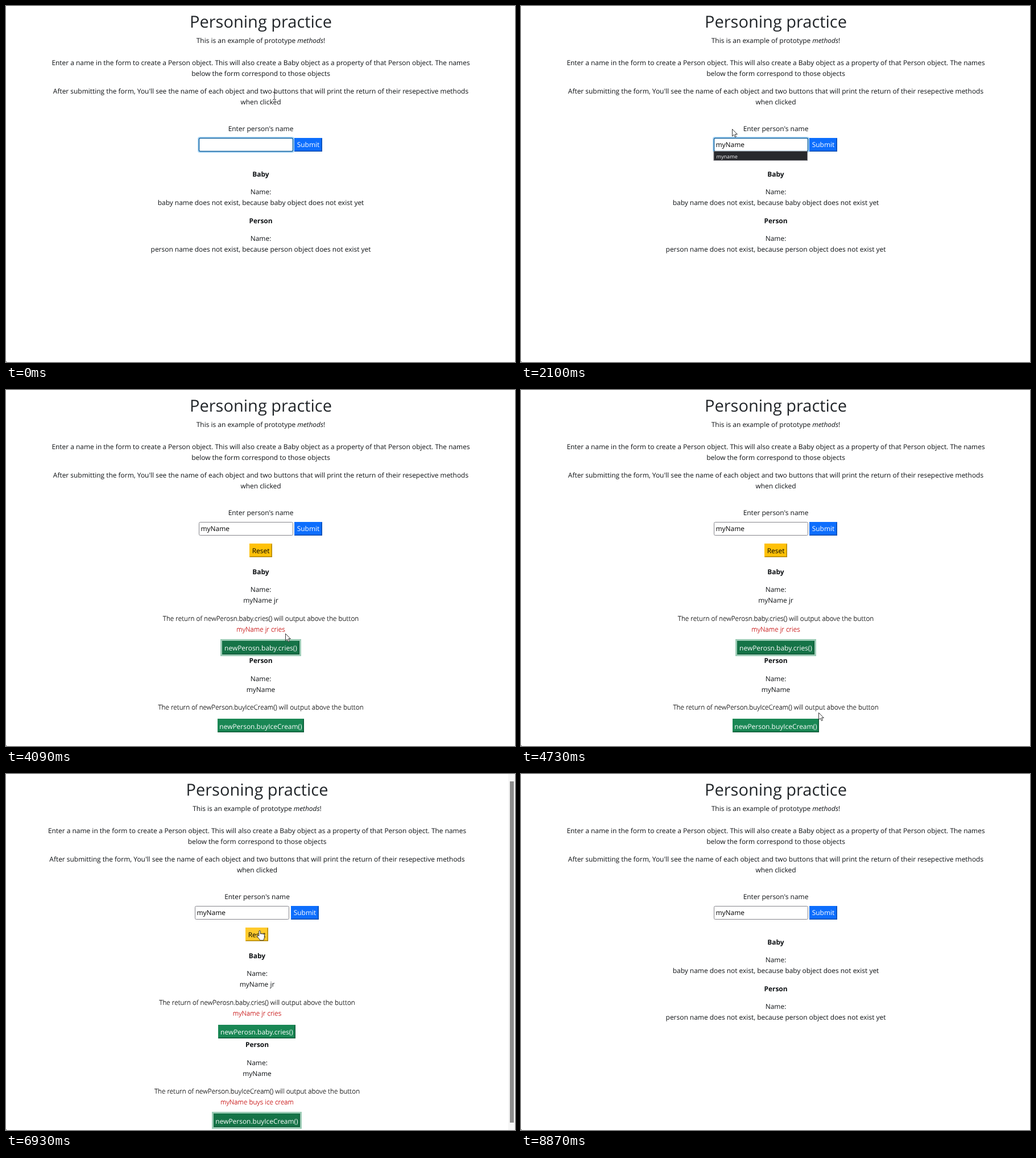
Write an HTML page that moves like this. It is 895x626 px and loops after 9040 ms.

```html
<!DOCTYPE html>
<html lang="en">
<head>
<meta charset="utf-8">
<title>Personing practice</title>
<style>
  html, body { margin: 0; width: 100%; height: 100%; overflow: hidden; background: #fff; }
  svg { display: block; width: 895px; height: 626px; }
  text {
    font: 11.95px "Open Sans", "Noto Sans", sans-serif;
    fill: #0e1114; text-anchor: middle; text-rendering: geometricPrecision; white-space: pre;
  }
  .title { font-size: 29px; fill: #212529; }
  .bold { font-weight: 700; }
  .light { font-weight: 300; font-size: 11.75px; fill: #000; stroke: #000; stroke-width: .15px; }
  .red { fill: #c40000; stroke: #c40000; }
  .left { text-anchor: start; }
  .off { display: none; }

  #page.scrolled { transform: translate(-7px, 0); }
  #page.scrolled .line { transform: translate(.5px, 0); }
  #page.scrolled #submit { transform: translate(1px, 0); }

  #box { fill: #fff; stroke: #85858c; }
  #glow { fill: none; stroke: #a9d5f5; stroke-width: 2; visibility: hidden; }
  #field.focus #box { stroke: #14639f; stroke-width: 1.5; }
  #field.focus #glow { visibility: visible; }
  #typed { fill: #000; }

  .ring { fill: var(--ring); visibility: hidden; }
  .focus .ring { visibility: visible; }
  .face { fill: var(--face); }
  .edge { fill: var(--edge); }
  .hot .face { fill: var(--hot); }
  .btn text { fill: var(--ink, #fff); }
  .blue { --face: #0d6efd; --hot: #0b5ed7; --edge: #0a4bac; --ring: #98c1fe; }
  .gold { --face: #ffc107; --hot: #ffca2c; --edge: #b08608; --ring: #ecd182; --ink: #000; }
  .green { --face: #198754; --hot: #157347; --edge: #105a38; --ring: #9dccb6; }

  #list rect { fill: #28292d; stroke: #77777d; }
  #list text { font-size: 9.1px; fill: #f4f4f6; }
  #cursor path { fill: #fff; stroke: #222; stroke-width: .9; stroke-linejoin: round; }
  #cursor .ibeam { fill: none; }
</style>
</head>
<body>
<svg viewBox="0 0 895 626">
  <g id="page">
    <text class="line title" x="448" y="38">Personing practice</text>
    <text class="line" x="448" y="65">This is an example of prototype <tspan font-style="italic">methods</tspan>!</text>
    <text class="line" x="448" y="104">Enter a name in the form to create a Person object. This will also create a Baby object as a property of that Person object. The names</text>
    <text class="line" x="448" y="123">below the form correspond to those objects</text>
    <text class="line" x="448" y="154">After submitting the form, You'll see the name of each object and two buttons that will print the return of their resepective methods</text>
    <text class="line" x="448" y="173">when clicked</text>
    <text class="line" x="448" y="220">Enter person's name</text>

    <g id="field">
      <rect id="glow" x="338" y="231" width="168" height="26" rx="3"/>
      <rect id="box" x="339.5" y="232.5" width="165" height="23" rx="2"/>
      <text id="typed" class="left" x="342.5" y="248"></text>
      <rect id="caret" y="235" width="1" height="17"/>
    </g>
    <g id="submit" class="btn blue" data-box="507 232 49 16">Submit</g>

    <g id="empty">
      <text class="bold" x="448" y="300">Baby</text>
      <text x="448" y="331">Name:</text>
      <text x="448" y="350">baby name does not exist, because baby object does not exist yet</text>
      <text class="bold" x="448" y="382">Person</text>
      <text x="448" y="413">Name:</text>
      <text x="448" y="432">person name does not exist, because person object does not exist yet</text>
    </g>

    <g id="made">
      <g id="reset" class="btn gold" data-box="428 270 40 17">Reset</g>
      <text class="line bold" x="448" y="324">Baby</text>
      <text class="line" x="448" y="355">Name:</text>
      <text class="line" x="448" y="374">myName jr</text>
      <text class="line light" x="448" y="406">The return of newPerosn.baby.cries() will output above the button</text>
      <text id="criesOut" class="line light red" x="448" y="425">myName jr cries</text>
      <g id="belowCries">
        <g id="cries" class="btn green" data-box="380 422 136 17">newPerosn.baby.cries()</g>
        <text class="line bold" x="448" y="461">Person</text>
        <text class="line" x="448" y="493">Name:</text>
        <text class="line" x="448" y="512">myName</text>
        <text class="line light" x="448" y="543">The return of newPerson.buyIceCream() will output above the button</text>
        <text id="buysOut" class="line light red" x="448" y="562">myName buys ice cream</text>
        <g id="belowBuys">
          <g id="buys" class="btn green" data-box="372 559 152 18">newPerson.buyIceCream()</g>
        </g>
      </g>
    </g>

    <g id="list">
      <rect x="339" y="255.5" width="164.5" height="16"/>
      <text class="left" x="343.5" y="268">myname</text>
      <text class="left" x="343.5" y="284">maryname</text>
      <text class="left" x="343.5" y="300">newname</text>
    </g>
  </g>

  <g id="scrollbar">
    <rect x="883" width="12" height="626" fill="#f6f6f6"/>
    <rect x="886" y="13" width="7" height="600" fill="#8b8b8b"/>
  </g>
  <rect y="625" width="1" height="1" fill="#333"/>

  <g id="cursor">
    <path class="arrow" d="M.5 .5V13L3.4 10.2 5.4 14.6 7.4 13.7 5.5 9.5H9.3Z"/>
    <path class="hand" d="M-1.3 10V1.8a1.3 1.3 0 0 1 2.6 0V6.4a1.2 1.2 0 0 1 2.4 .2a1.2 1.2 0 0 1 2.4 .4a1.1 1.1 0 0 1 2.2 .6V12.5C8.3 14.5 7.1 15.3 6.9 17.3H.5C.2 15.5-3.3 12.4-4.2 10.4C-4.8 8.9-3.2 8.1-2.2 9.2Z"/>
    <path class="ibeam" d="M-3-6.5H-.8L0-6 .8-6.5H3M0-6V6M-3 6.5H-.8L0 6 .8 6.5H3"/>
  </g>
</svg>
<script>
const LOOP = 9040, TICK = 90, LINE = 19;
const $ = id => document.getElementById(id);
const show = (id, on) => $(id).classList.toggle('off', !on);
const between = (t, a, b) => t >= a && t < b;

// Turn each button group's label into ring, face, dark edge and text.
for (const g of document.querySelectorAll('.btn')) {
  const [x, y, w, base] = g.dataset.box.split(' ').map(Number);
  const label = g.textContent;
  g.innerHTML = `
    <rect class="ring" x="${x - 3}" y="${y - 3}" width="${w + 6}" height="30"/>
    <rect class="face" x="${x}" y="${y}" width="${w}" height="24"/>
    <path class="edge" d="M${x + w} ${y}v24h${-w}l1.5-1.5h${w - 3}v-21z"/>
    <text x="${x + w / 2}" y="${y + base}">${label}</text>`;
}

// Pointer path: time, x, y, and the shape worn from there on.
const path = [
  [0, 472, 158, 'ibeam'], [750, 472, 158, ''],
  [1920, 472, 158, 'ibeam'], [2010, 420, 190, 'arrow'], [2100, 371, 216, 'arrow'],
  [2190, 445, 243, 'ibeam'], [2280, 533, 249, 'hand'], [2850, 533, 249, 'hand'],
  [2940, 534, 268, 'arrow'], [3210, 537, 336, 'arrow'], [3560, 512, 416, 'arrow'],
  [3650, 503, 424, 'hand'], [3820, 492, 428, 'hand'], [4000, 492, 428, 'arrow'],
  [4270, 490, 427, 'arrow'], [4370, 490, 427, 'arrow'], [4460, 492, 438, 'arrow'],
  [4730, 523, 567, 'arrow'], [4820, 520, 577, 'arrow'], [4910, 516, 582, 'hand'],
  [5180, 516, 582, 'arrow'], [5280, 516, 582, 'arrow'], [5370, 517, 581, 'arrow'],
  [5460, 516, 580, 'arrow'], [6110, 516, 580, 'arrow'], [6200, 519, 566, 'arrow'],
  [6470, 530, 470, 'arrow'], [6750, 475, 310, 'arrow'], [6840, 452, 281, 'hand'],
  [6930, 446, 275, 'hand'], [7480, 446, 275, 'arrow'], [8600, 446, 275, 'arrow'],
  [8690, 600, 235, 'arrow'], [8780, 880, 156, 'arrow'], [8870, 895, 155, '']
];
const keys = [750, 1120, 1210, 1290, 1380, 1470];
const focusOrder = [[0, 'field'], [2470, 'submit'], [3910, 'cries'], [5090, 'buys'], [7400, 'reset'], [7480, '']];
const hovers = { submit: [2280, 2940], cries: [3650, 4000], buys: [4910, 5180], reset: [6840, 7480] };

const latest = (list, t) => list.findLastIndex(step => step[0] <= t);

function drawCursor(t) {
  const i = latest(path, t);
  const [t0, x0, y0, shape] = path[i];
  const [t1, x1, y1] = path[i + 1] || path[i];
  const u = t1 > t0 ? Math.floor((t - t0) / TICK) * TICK / (t1 - t0) : 0;
  const x = Math.round(x0 + (x1 - x0) * u), y = Math.round(y0 + (y1 - y0) * u);
  $('cursor').setAttribute('transform', `translate(${x} ${y})`);
  for (const p of $('cursor').children) p.classList.toggle('off', !p.classList.contains(shape));
}

function drawField(t) {
  const text = 'myName'.slice(0, keys.filter(k => k <= t).length);
  if ($('typed').textContent !== text) $('typed').textContent = text;
  const width = text ? $('typed').getComputedTextLength() : 0;
  $('caret').setAttribute('x', Math.round(342 + width));
  show('caret', between(t, 90, 560) || between(t, 750, 1650) || between(t, 2190, 2470));

  const rows = between(t, 840, 1210) ? 3 : 1;
  const [frame, ...items] = $('list').children;
  frame.setAttribute('height', rows * 16);
  items.forEach((item, i) => item.classList.toggle('off', i >= rows));
  show('list', between(t, 840, 2470));
}

function drawPage(t) {
  const made = between(t, 2560, 7480), cried = t >= 4000, bought = t >= 5180;
  show('empty', !made);
  show('made', made);
  show('criesOut', cried);
  show('buysOut', bought);
  show('scrollbar', made && bought);
  $('page').classList.toggle('scrolled', made && bought);
  $('belowCries').setAttribute('transform', `translate(0 ${cried ? LINE : 0})`);
  $('belowBuys').setAttribute('transform', `translate(0 ${bought ? LINE : 0})`);

  const focus = focusOrder[latest(focusOrder, t)][1];
  $('field').classList.toggle('focus', focus === 'field');
  for (const id in hovers) {
    $(id).classList.toggle('focus', focus === id);
    $(id).classList.toggle('hot', focus === id || between(t, ...hovers[id]));
  }
}

const start = performance.now();
function frame() {
  const t = (performance.now() - start) % LOOP;
  drawPage(t);
  drawField(t);
  drawCursor(t);
  requestAnimationFrame(frame);
}
frame();
</script>
</body>
</html>
```
